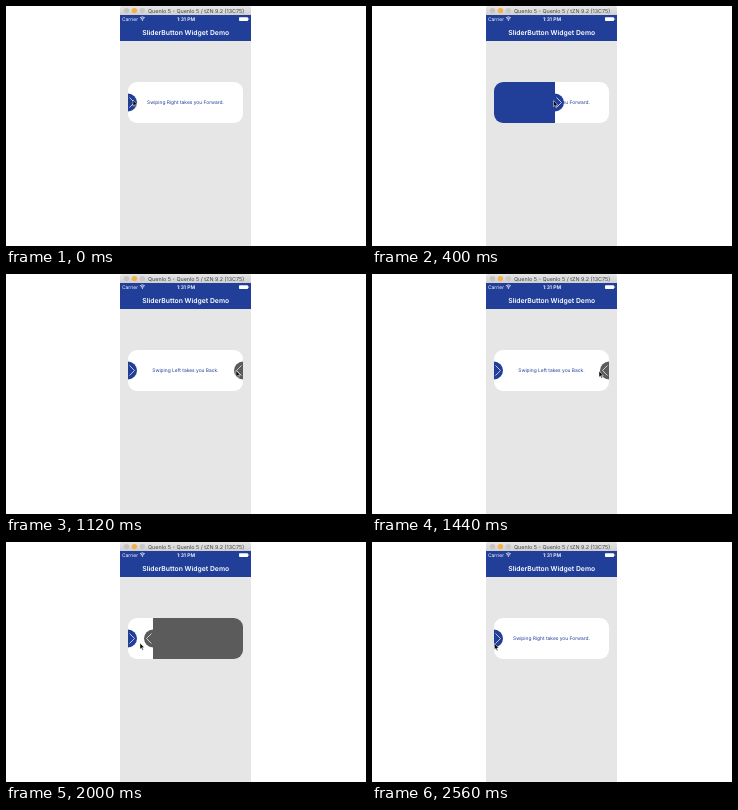
An HTML page that plays this animation: 360x240 px, repeating every 2720 ms.

```html
<!DOCTYPE html>
<html lang="en">
<head>
<meta charset="utf-8">
<title>Slider button demo</title>
<style>
  html, body { margin: 0; width: 100%; height: 100%; overflow: hidden; background: #fff; }
  svg { display: block; width: 360px; height: 240px; }
  text { font-family: Inter, "Open Sans", sans-serif; text-rendering: geometricPrecision; }
  .mid { text-anchor: middle; }
  .chevron { fill: none; stroke: #fff; stroke-width: .7; }
</style>
</head>
<body>
<svg viewBox="0 0 360 240">
  <defs>
    <linearGradient id="chrome" x2="0" y2="1">
      <stop stop-color="#e6e6e6"/><stop offset="1" stop-color="#d0d0d0"/>
    </linearGradient>
    <clipPath id="card"><rect x="122" y="76" width="115" height="41" rx="9"/></clipPath>
  </defs>

  <path d="M114 9V2q0-2 2-2h127q2 0 2 2v7z" fill="url(#chrome)"/>
  <circle cx="120.5" cy="4.6" r="2.7" fill="#c8c3c1"/>
  <circle cx="128.4" cy="4.6" r="2.7" fill="#f4b147"/>
  <circle cx="136.3" cy="4.6" r="2.7" fill="#c9c9c9"/>
  <text x="142" y="6.6" font-size="5.4" fill="#444">Quenlo 5 - Quenlo 5 / tZN 9.2 (13C75)</text>

  <rect x="114" y="9" width="131" height="231" fill="#e6e6e6"/>
  <rect x="114" y="9" width="131" height="26" fill="#213f99"/>
  <g fill="#fff">
    <text x="116" y="15" font-size="4.9">Carrier</text>
    <text class="mid" x="180" y="15" font-size="5" font-weight="600">1:31 PM</text>
    <text class="mid" x="179.7" y="28.6" font-size="6.8" font-weight="600">SliderButton Widget Demo</text>
    <rect x="233" y="11.2" width="9" height="3.7" rx=".7"/>
    <rect x="242.4" y="12.3" width=".7" height="1.5"/>
    <path d="M136.4 14.9l-1-1.2q1-.8 2 0z"/>
  </g>
  <path d="M134.7 12.9q1.7-1.4 3.4 0M133.9 11.8q2.5-2 5 0" fill="none" stroke="#fff" stroke-width=".7"/>

  <g clip-path="url(#card)">
    <rect x="122" y="76" width="115" height="41" fill="#fff"/>
    <text id="label" class="mid" x="179.5" y="98.3" font-size="4.9" fill="#213f99"></text>
    <g id="forward">
      <rect x="-120" y="76" width="120" height="41" fill="#213f99"/>
      <circle cy="96.5" r="9" fill="#213f99"/>
      <path class="chevron" d="M1.5 91.5l5 5-5 5"/>
    </g>
    <g id="back">
      <rect y="76" width="120" height="41" fill="#5b5b5b"/>
      <circle cy="96.5" r="9" fill="#5b5b5b"/>
      <path class="chevron" d="M-1.5 91.5l-5 5 5 5"/>
    </g>
  </g>
  <path id="cursor" d="M0 0v6.2l1.4-1.3 1 2.3 1-.5-1-2.1h1.9z" fill="#000" stroke="#fff" stroke-width=".5"/>
</svg>
<script>
const LOOP = 2720, STEP = 80, LEFT = 122, RIGHT = 237;
const $ = id => document.getElementById(id);

// Each key is [time, value, ...].
const forwardKeys = [[0, LEFT], [80, LEFT], [400, 183], [560, 213], [720, RIGHT]];
const backKeys = [[1520, RIGHT], [1600, 224], [1680, 204], [2000, 147], [2160, LEFT]];
const cursorKeys = [
  [0, 127, 94], [80, 127, 94], [400, 181.5, 94.5], [560, 211, 96], [720, 225, 97],
  [800, 225, 97], [1120, 230, 96.5], [1440, 227, 97], [1520, 227, 97], [1600, 214, 97],
  [1680, 195, 97], [2000, 134, 101], [2160, 122, 101], [2400, 124, 101], [2560, 122.5, 101.5]
];

function sample(keys, t) {
  const next = keys.findIndex(key => key[0] > t);
  if (next < 0) return keys[keys.length - 1].slice(1);
  if (next === 0) return keys[0].slice(1);
  const a = keys[next - 1], b = keys[next];
  const k = (t - a[0]) / (b[0] - a[0]);
  return a.slice(1).map((v, i) => v + (b[i + 1] - v) * k);
}

const move = (id, [x, y = 0]) => $(id).setAttribute("transform", `translate(${x} ${y})`);

function draw(now) {
  const t = Math.floor(now % LOOP / STEP) * STEP;
  const secondPage = t >= 960 && t < 2400;
  $("label").textContent = secondPage ? "Swiping Left takes you Back." : "Swiping Right takes you Forward.";
  $("back").style.display = secondPage ? "" : "none";
  move("forward", t < 960 ? sample(forwardKeys, t) : [LEFT]);
  move("back", sample(backKeys, t));
  move("cursor", sample(cursorKeys, t));
}

const start = performance.now();
function tick() {
  draw(performance.now() - start);
  requestAnimationFrame(tick);
}
tick();
</script>
</body>
</html>
```
